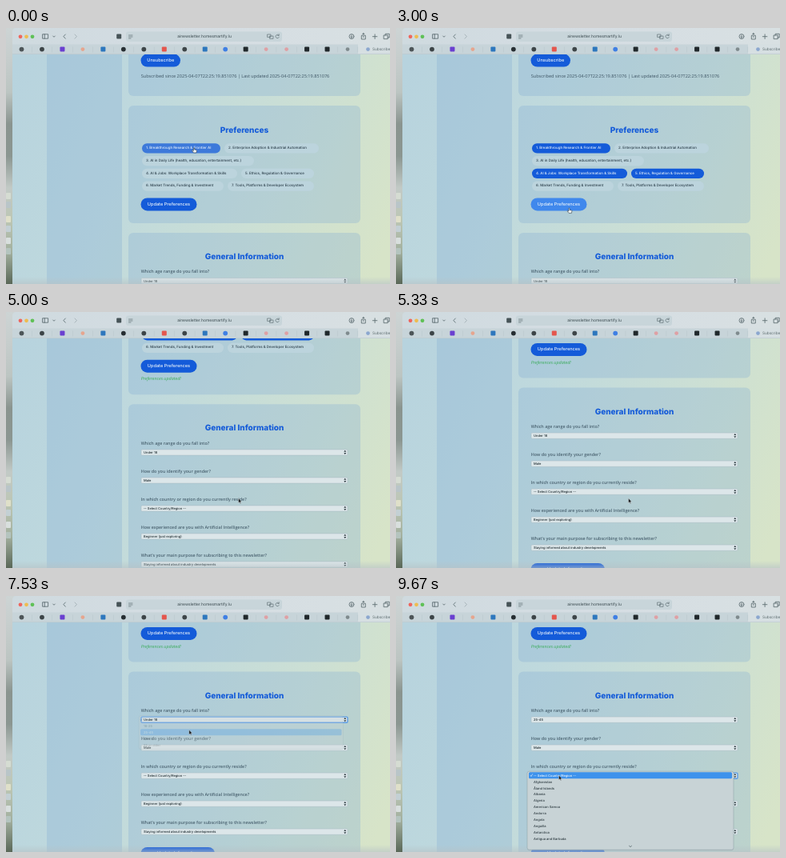
Recreate the animation shown at these times as an HTML page. Size 480 by 320 pixels, loop 9.74 s.

```html
<!DOCTYPE html>
<html lang="en">
<head>
<meta charset="utf-8">
<title>Newsletter preferences</title>
<style>
  html, body { margin: 0; width: 100%; height: 100%; overflow: hidden; }
  svg { display: block; width: 100vw; height: 100vh; }
  text { font-family: Inter, sans-serif; dominant-baseline: central; white-space: pre; text-rendering: geometricPrecision; }
  .title { font-size: 10px; font-weight: 800; fill: #145bd9; text-anchor: middle; }
  .chip { font-size: 4.45px; font-weight: 500; }
  .button { font-size: 5.6px; font-weight: 500; fill: #eaf3fb; text-anchor: middle; }
  .note { font: 5.57px "Open Sans", sans-serif; fill: #3c5362; }
  .label { font: 600 5.38px "Open Sans", sans-serif; fill: #4a6270; }
  .done { font: italic 5.4px "Open Sans", sans-serif; fill: #36aa55; }
  .field { font-size: 4.05px; font-weight: 500; fill: #1f2b30; }
  .line { fill: none; stroke: #536469; stroke-width: .8; stroke-linecap: round; stroke-linejoin: round; }
</style>
</head>
<body>
<svg id="stage" viewBox="0 0 480 320" preserveAspectRatio="none"></svg>
<script>
const LOOP = 9740, BLUE = '#145bd9', HOVER = '#4088ec', PANEL = 'rgba(130,170,208,.31)';
const stage = document.getElementById('stage');

const rect = (x, y, w, h, fill, r = 0, extra = '') =>
  `<rect x="${x}" y="${y}" width="${w}" height="${h}" rx="${r}" fill="${fill}" ${extra}/>`;
const dot = (x, y, r, fill) => `<circle cx="${x}" cy="${y}" r="${r}" fill="${fill}"/>`;
const text = (x, y, cls, s, extra = '') =>
  `<text x="${x}" y="${y}" class="${cls}" ${extra}>${s.replace(/&/g, '&amp;')}</text>`;
const line = (d, extra = '') => `<path d="${d}" class="line" ${extra}/>`;
const card = (y, h, id = '') => rect(153, y, 290, h, PANEL, 6, id && `id="${id}"`);
const button = (x, y, w, label, id = '') =>
  rect(x, y, w, 16, BLUE, 8, id && `id="${id}"`) + text(x + w / 2, y + 8.1, 'button', label);

// x, centre y, width, label, time of the click
const chips = [
  [170, 150.4, 98, '1. Breakthrough Research & Frontier AI', -150],
  [273, 150.4, 118, '2. Enterprise Adoption & Industrial Automation'],
  [170, 166.1, 140, '3. AI in Daily Life (health, education, entertainment, etc.)'],
  [170, 181.9, 119, '4. AI & Jobs: Workplace Transformation & Skills', 1120],
  [294, 181.9, 91, '5. Ethics, Regulation & Governance', 2170],
  [170, 197.6, 102, '6. Market Trends, Funding & Investment'],
  [277, 197.6, 108, '7. Tools, Platforms & Developer Ecosystem']
];
const questions = [
  ['Which age range do you fall into?', 'Under 18'],
  ['How do you identify your gender?', 'Male'],
  ['In which country or region do you currently reside?', '-- Select Country/Region --'],
  ['How experienced are you with Artificial Intelligence?', 'Beginner (just exploring)'],
  ['What’s your main purpose for subscribing to this newsletter?', 'Staying informed about industry developments']
];
const ages = ['Under 18', '18-25', '25-45', '45-65', '65 or older'];
const countries = ['-- Select Country/Region --', 'Afghanistan', 'Åland Islands', 'Albania', 'Algeria',
  'American Samoa', 'Andorra', 'Angola', 'Anguilla', 'Antarctica', 'Antigua and Barbuda'];
const ROW = 7.87;

function question([label, value], i) {
  const y = 316 + i * 35;
  return text(168.7, y - 11.7, 'label', label) +
    rect(169, y - 3.4, 258, 7.2, '#dce6e9', 1.2, `id="field${i}" stroke="#a6b8c0" stroke-width=".5"`) +
    text(172, y + .2, 'field', value, `id="value${i}"`) +
    `<path d="M422.3 ${y - .5}l1.5-2 1.5 2zM422.3 ${y + .7}l1.5 2 1.5-2z" fill="#27343a"/>`;
}

function menu(id, x, y, w, h, items) {
  return `<g id="${id}">` +
    rect(x, y - 5, w, h, '#8fa2a8', 3, 'opacity=".35" transform="translate(0 1)"') +
    rect(x, y - 5, w, h, '#c8d3d6', 2.5, 'stroke="#8b9da3" stroke-width=".5"') +
    rect(x + 2, y - 4, w - 4, 8, '#3d92ec', 1.5, `id="${id}Row"`) +
    items.map((s, i) => text(172, y + i * ROW + .1, 'field', s, `data-row="${i}"`)).join('') +
    line(`M168 ${y}l1 1.3 1.6-2.8`, `id="${id}Check" style="stroke:#26343a;stroke-width:.6"`) + '</g>';
}

const desktop = rect(0, 0, 14, 320, 'url(#wall)') +
  [[206, '#d5dcd2'], [217, '#b9c5c8'], [235, '#dfe0c9'], [247, '#c3d0d4'], [262, '#d8dfdd'], [275, '#b4c4be']]
    .map(([y, c]) => rect(0, y, 6, 8, c, 1)).join('');

const page = `<g clip-path="url(#view)">` +
  rect(8, 32, 472, 288, 'url(#page)') + rect(51, 32, 94, 288, PANEL) +
  `<g id="scroll">` +
    card(-60, 145) + button(168.5, 32.6, 49.5, 'Unsubscribe') +
    text(168.7, 60, 'note', 'Subscribed since 2025-04-07T22:25:19.851076 | Last updated 2025-04-07T22:25:19.851076') +
    card(97, 147, 'prefs') + text(298, 127.7, 'title', 'Preferences') +
    chips.map(([x, y, w, s], i) => rect(x, y - 6.2, w, 12.4, '#bcd4dd', 6.2, `id="chip${i}"`) +
      text(x + 5, y + .1, 'chip', s, `id="chipText${i}"`)).join('') +
    button(168.5, 212.4, 70, 'Update Preferences', 'update') +
    text(168.7, 236, 'done', 'Preferences updated!', 'id="done"') +
    `<g id="form">` + card(256, 250) + text(298, 286.1, 'title', 'General Information') +
      questions.map(question).join('') + button(168.5, 475.5, 92.5, 'Update Information') + `</g></g>` +
  rect(8, 311, 472, 9, 'url(#fade)') + '</g>';

const tabColors = ['#4d5558', '#3c4447', '#6a3fd0', '#e6a58e', '#2d77bd', '#262e32', '#3d4548', '#e4564d', '#3d4548',
  '#2d77bd', '#3f7fe4', '#20282b', '#dfa0a4', '#dfa0a4', '#20282b', '#20282b', '#7f8b8e', '#8ba7cf'];
const squareTabs = [2, 4, 7, 9, 11, 14, 15];
const tabs = tabColors.map((c, i) => {
  const x = 19.5 + i * 25.47;
  return (squareTabs.includes(i) ? rect(x - 3, 23.6, 6, 6, c, 1) : dot(x, 26.6, i === 3 || i > 11 ? 2.4 : 2.9, c)) +
    (i < 17 ? rect(x + 12.6, 23.5, .4, 7, '#b4c2c7') : '');
}).join('');

const browser =
  `<path d="M8 33V5Q8 0 13 0H480V33Z" fill="url(#bar)"/>` +
  rect(8, 20.5, 432, 12, '#c7d4d9') + rect(440, 20.5, 40, 12, '#d6dfe2') + rect(8, 32.2, 472, .5, '#b0c0c6') +
  dot(18, 10.8, 2.4, '#ee665f') + dot(25.5, 10.8, 2.4, '#eebc50') + dot(33, 10.8, 2.4, '#5fc157') +
  line('M46 7.8h6.6v5.4h-6.6zM48.2 7.8v5.4M58.7 10l1.3 1.3 1.3-1.3M74.3 8l-2.4 2.6 2.4 2.6') +
  line('M86 8l2.4 2.6-2.4 2.6', 'opacity=".4"') +
  rect(138.2, 7.6, 6, 6, '#465357', 1) + rect(150, 4.5, 195, 12.5, '#c8d5da', 3) +
  line('M153.5 9h4.5M153.5 11h4.5M153.5 13h2.5', 'opacity=".8"') +
  text(248, 10.9, 'field', 'ainewsletter.homesmartify.lu', 'style="font-size:5px;font-weight:400;fill:#38474c;text-anchor:middle"') +
  line('M327 8h4v3.4h-4zM330 10h4v3.4h-4zM341 9.2a2.2 2.2 0 1 0 .3 2.2M341.2 7.7v1.7h-1.7', 'style="stroke-width:.6"') +
  line('M435 10.6a3 3 0 1 1-6 0a3 3 0 1 1 6 0M432 9v3M430.8 11l1.2 1.2 1.2-1.2') +
  line('M445.3 9.5h-1v4.5h5v-4.5h-1M446.8 11.5v-5M445.4 8l1.4-1.5 1.4 1.5M458.3 10.7h5.6M461.1 7.9v5.6M472.5 9h4.7v4.7h-4.7zM474.2 9v-1.7h5v4.7h-2') +
  tabs + text(458, 26.8, 'field', 'Subscribe...', 'style="font-size:4.7px;font-weight:400;fill:#5d6d70"');

const pointer = `<g id="cursor"><path id="arrow" d="M0 0V6L1.4 4.8 2.3 6.8 3.2 6.4 2.3 4.5H4.1Z"
    fill="#15191b" stroke="#e8eef0" stroke-width=".4"/>
  <path id="hand" d="M-.6 .4Q0-.4 .6 .4V2.4L3 3Q3.5 3.2 3.4 4L2.9 6.4H-.5L-2.4 3.9Q-2.2 3-1.5 3.4L-.6 4.1Z"
    fill="#f1f5f5" stroke="#27343b" stroke-width=".55"/></g>`;

const gradient = (id, axis, ...colors) => `<linearGradient id="${id}" gradientUnits="userSpaceOnUse" ${axis}>` +
  colors.map((c, i) => `<stop offset="${i / (colors.length - 1)}" stop-color="${c}"/>`).join('') + '</linearGradient>';

stage.innerHTML = '<defs><clipPath id="view"><rect x="8" y="32" width="472" height="288"/></clipPath>' +
  gradient('wall', 'x1="0" y1="0" x2="0" y2="320"',
    '#cdd4d4', '#c6cdcc', '#bcc5c2', '#8a948f', '#8b9691', '#c2cac6', '#bcc6b4', '#a3b09f', '#5a6858') +
  gradient('page', 'x1="8" y1="60" x2="480" y2="260"', '#b7d3de', '#bfd9dd', '#cbdfd5', '#d7e4c8') +
  gradient('bar', 'x1="8" y1="0" x2="480" y2="0"', '#cfdadf', '#d5dde3', '#d8e0e2') +
  gradient('fade', 'x1="0" y1="311" x2="0" y2="320"', 'rgba(182,194,198,0)', 'rgba(182,194,198,.6)') + '</defs>' +
  desktop + page + browser +
  menu('age', 166, 154.5, 255.5, 42, ages) + menu('country', 164, 224.2, 258, 98, countries) +
  line('M291.5 312.3l1.5 1.4 1.5-1.4', 'id="more"') + pointer;

const el = {};
stage.querySelectorAll('[id]').forEach(n => el[n.id] = n);
el.country.append(el.more);

const clamp = v => Math.max(0, Math.min(1, v));
const smooth = v => v * v * (3 - 2 * v);
const mix = (a, b, k) => a.map((v, i) => v + (b[i] - v) * k);
const rgb = c => `rgb(${c.map(Math.round)})`;
const show = (node, on) => node.setAttribute('display', on ? 'inline' : 'none');

function track(keys, t, ease = v => v) {
  const i = keys.findIndex(k => k[0] > t);
  if (i < 0) return keys[keys.length - 1].slice(1);
  if (i === 0) return keys[0].slice(1);
  const [a, b] = [keys[i - 1], keys[i]];
  return mix(a.slice(1), b.slice(1), ease((t - a[0]) / (b[0] - a[0])));
}

const scrollKeys = [[4400, 0], [4470, 8], [4600, 45], [4850, 124], [5050, 162], [5250, 173.5]];
const cursorKeys = [
  [250, 235, 149.5], [1000, 270.5, 182.5], [1550, 270.5, 182.5], [2080, 336, 182.5], [2330, 336, 182.5],
  [2880, 216.5, 225], [3500, 216.5, 225], [4050, 290.5, 232.8], [5500, 290.5, 232.8], [6100, 240, 153],
  [6500, 240, 153], [7200, 228.8, 167.3], [7900, 228.8, 167.3], [8850, 203.5, 224]
];

function highlight(id, y, row) {
  el[id + 'Row'].setAttribute('y', y - 4 + row * ROW);
  el[id].querySelectorAll('[data-row]').forEach((n, i) => n.style.fill = i === row ? '#f2f7fb' : '#2d3b40');
  el[id + 'Check'].style.stroke = row === 0 ? '#f2f7fb' : '#2d3b40';
}

function focusRing(field, on) {
  field.setAttribute('stroke', on ? '#5a9be4' : '#a6b8c0');
  field.setAttribute('stroke-width', on ? 1.4 : .5);
}

function draw(t) {
  const [x, y] = track(cursorKeys, t, smooth);
  const over = (l, top, w, h) => t < 4400 && x >= l && x <= l + w && y >= top && y <= top + h;

  chips.forEach(([l, cy, w, , click = Infinity], i) => {
    const k = clamp((t - click) / 200);
    el['chip' + i].setAttribute('fill', rgb(mix([188, 212, 221], [20, 91, 217], k)));
    el['chipText' + i].setAttribute('fill', rgb(mix([43, 62, 74], [234, 243, 251], clamp(k * 2))));
  });
  const onButton = over(168.5, 212.4, 70, 16);
  el.update.setAttribute('fill', onButton ? HOVER : BLUE);

  const updated = t >= 3350, shift = updated ? 12 : 0;
  show(el.done, updated);
  el.prefs.setAttribute('height', 147 + shift);
  el.form.setAttribute('transform', `translate(0 ${shift})`);
  el.scroll.setAttribute('transform', `translate(0 ${-track(scrollKeys, t)[0]})`);

  show(el.age, t >= 6350 && t < 7560);
  el.age.setAttribute('opacity', 1 - clamp((t - 7450) / 110));
  highlight('age', 154.5, Math.max(0, Math.min(4, Math.round((y - 154.5) / ROW))));
  el.value0.textContent = t < 7600 ? 'Under 18' : '25-45';
  focusRing(el.field0, t >= 6350 && t < 9150);

  const countryOpen = t >= 9150;
  show(el.country, countryOpen);
  highlight('country', 224.2, 0);
  focusRing(el.field2, countryOpen);

  const hand = onButton || chips.some(([l, cy, w]) => over(l, cy - 6, w, 12));
  show(el.hand, hand);
  show(el.arrow, !hand);
  el.cursor.setAttribute('transform', `translate(${x} ${y})`);
}

const start = performance.now();
function tick() {
  draw((performance.now() - start) % LOOP);
  requestAnimationFrame(tick);
}
tick();
</script>
</body>
</html>
```
